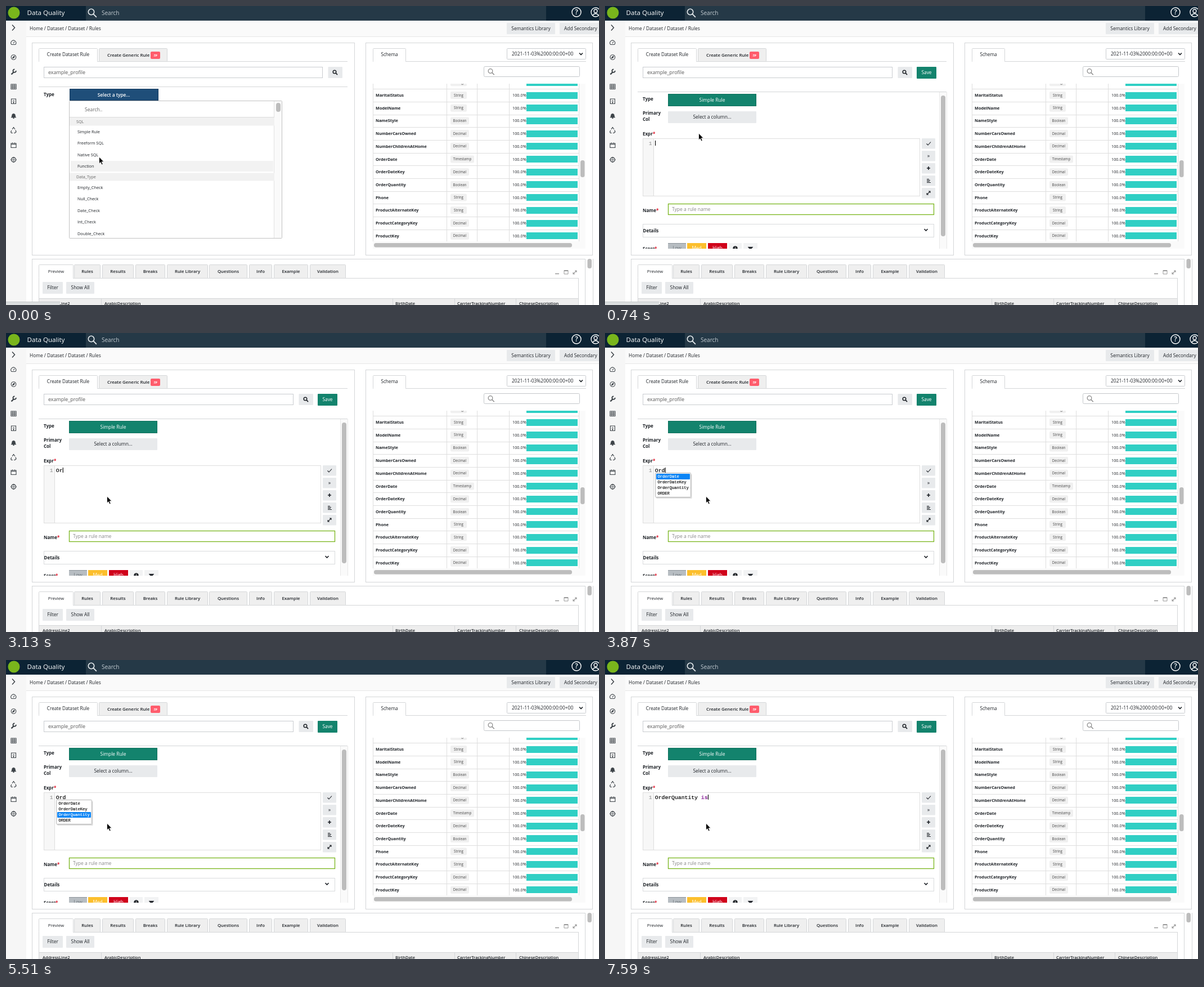
An HTML page that plays this animation: 1054x531 px, repeating every 8 s.

```html
<!DOCTYPE html>
<html lang="en">
<head>
<meta charset="utf-8">
<title>Dataset rules</title>
<style>
html, body { margin: 0; height: 100%; overflow: hidden; background: #fff; }
svg { display: block; width: 100vw; height: 100vh; font-family: "Open Sans", "Noto Sans", sans-serif; }
text { white-space: pre; }
.mono { font-family: "Liberation Mono", monospace; stroke: currentColor; stroke-width: .2px; }
</style>
</head>
<body>
<svg id="stage" viewBox="0 0 1054 531" preserveAspectRatio="none"></svg>
<script>
const INK = '#1f2328', LINE = '#d4d6d8', SOFT = '#e8eaec', THUMB = '#bdbdbd', GREEN = '#13836d';

// Shape helpers: boxes take left, top, right, bottom; text takes the middle of its line.
const rect = (x, y, r, b, fill, round = 0) =>
  `<rect x="${x}" y="${y}" width="${r - x}" height="${b - y}" rx="${round}" fill="${fill}"/>`;
const frame = (x, y, r, b, stroke = LINE, fill = '#fff', round = 0, w = 1) =>
  `<rect x="${x + .5}" y="${y + .5}" width="${r - x - 1}" height="${b - y - 1}" rx="${round}" fill="${fill}" stroke="${stroke}" stroke-width="${w}"/>`;
const path = (d, stroke = INK, w = 1, fill = 'none') =>
  `<path d="${d}" stroke="${stroke}" stroke-width="${w}" fill="${fill}"/>`;
const circle = (x, y, r, stroke, w = 1, fill = 'none') =>
  `<circle cx="${x}" cy="${y}" r="${r}" stroke="${stroke}" stroke-width="${w}" fill="${fill}"/>`;
const text = (s, x, y, size = 8.3, weight = 500, fill = INK, anchor = 'start', extra = '') =>
  `<text x="${x}" y="${y + size * .35}" font-size="${size}" font-weight="${weight}" fill="${fill}" text-anchor="${anchor}" ${extra}>${s}</text>`;
const mid = (s, x, y, size, weight, fill) => text(s, x, y, size, weight, fill, 'middle');
const mono = (s, x, y, size, fill) => text(s, x, y, size, 400, fill, 'start', `class="mono" color="${fill}"`);
const button = (s, x, y, r, b, fill = SOFT, ink = INK, size = 8.4) =>
  rect(x, y, r, b, fill, 1) + mid(s, (x + r) / 2, (y + b) / 2, size, 500, ink);
const lens = (x, y, r, color, w) =>
  circle(x, y, r, color, w) + path(`M${x + r * .7} ${y + r * .7}l${r * 1.1} ${r * 1.1}`, color, w * 1.15);
const chevron = (x, y, color = INK) => path(`M${x - 3} ${y - 1.5}l3 3l3-3`, color, 1.7);
const tab = (s, x, y, r, b, active) =>
  frame(x, y, r, b + 1, LINE, active ? '#fff' : '#efefef', 1) +
  (active ? rect(x + 1, b - .5, r - 1, b + 2, '#fff') : path(`M${x} ${b + .5}H${r}`, LINE)) +
  mid(s, (x + r) / 2, (y + b) / 2, active === undefined ? 7.8 : 8.2, active === undefined ? 600 : 500);
const expand = (x, y, color) =>
  path(`M${x - 3} ${y + 3}l6-6M${x} ${y - 3}h3v3M${x - 3} ${y}v3h3`, color, 1.1);

function header() {
  return rect(0, 0, 1054, 26, '#0c2334') + rect(142, 0, 960, 26, '#253947') +
    circle(14, 12, 10.5, 'none', 0, '#79b51c') +
    text('Data Quality', 37.5, 12, 11.6, 500, '#fff') +
    lens(151.5, 10.5, 5.2, '#e8edf0', 1.6) + text('Search', 170, 12, 10, 400, '#c3ccd2') +
    circle(1014, 11, 8, '#fff', 1.4) + mid('?', 1014, 11, 12, 600, '#fff') +
    circle(1048, 11, 8, '#fff', 1.4) + circle(1048, 9, 3, '#fff', 1.3) +
    path('M1042.5 16.5q5.5-6 11 0', '#fff', 1.3) +
    rect(0, 26, 36, 531, '#f6f6f6') + rect(36, 26, 1054, 54, '#fafafa') + path('M36 54.5H1054', '#e6e6e6') +
    text('Home / Dataset / Dataset / Rules', 42, 40, 8.35) +
    button('Semantics Library', 890, 30, 976, 50) +
    rect(984, 30, 1054, 50, SOFT) + text('Add Secondary', 992, 40, 8.4);
}

function sidebar() {
  const c = '#3d4348';
  return path('M11 33.5l4.5 5l-4.5 5', c, 1.5) +
    path('M9.8 68.5a4.5 4.5 0 1 1 7 0zM13 66.5l2-3', c, 1.1) +
    circle(13.5, 91, 4.3, c, 1.1) + path('M15.8 88.7l-1.3 3.3l-3.3 1.3l1.3-3.3z', c, .5, c) +
    path('M9.5 121.5l4.5-4.5', c, 2.4) + path('M17.8 114.8a2.7 2.7 0 1 1-2.5-2.3', c, 1.9) +
    path('M9 139h9v8.5h-9zM9 142h9M9 144.8h9M12 139v8.5M15 139v8.5', c, 1.1) +
    path('M9.5 165h8v8.5h-8zM12 168h3M12 170.5h3M13.5 171v2.5', c, 1.1) +
    path('M9 198q1.5-1 1.5-3.5q0-3 3-3.3q3 .3 3 3.3q0 2.5 1.5 3.5z', c, .6, c) + circle(13.5, 199, 1, c, .5, c) +
    path('M11 219l2.5-3.5l2.5 3.5M17 220.5l1 3l-2 2h-2M12 225.5h-2.5l-.8-2l1.3-2.5', c, 1.2) +
    path('M9 244h9v7.5h-9zM9 245.5h9M11.5 242.5v2M15.5 242.5v2', c, 1.1) +
    circle(13.5, 273, 4, c, 1.4) + circle(13.5, 273, 1.5, c, 1) +
    path('M13.5 268v1.5M13.5 276.5v1.5M8.5 273h1.5M17 273h1.5', c, 1.4);
}

function schema() {
  const rows = ['', 'MaritalStatus', 'ModelName', 'NameStyle', 'NumberCarsOwned', 'NumberChildrenAtHome', 'OrderDate',
    'OrderDateKey', 'OrderQuantity', 'Phone', 'ProductAlternateKey', 'ProductCategoryKey', 'ProductKey'];
  const types = { S: ['String', 29], B: ['Boolean', 33], D: ['Decimal', 33], T: ['Timestamp', 42] };
  const table = rows.map((name, i) => {
    const y = 135.8 + 22.7 * i, top = Math.round(y - 6), [type, w] = types['SSSBDDTDBSSDD'[i]];
    return path(`M652 ${Math.round(y + 11.3) + .5}H1018`, '#dedede') + text(name, 657, y, 7.3, 700) +
      rect(790, y - 6.5, 790 + w, y + 6.5, '#f0f0f0', 2) + mid(type, 790 + w / 2, y, 6.2, 400, '#444') +
      text('100.0%', 900, y, 7.3, 500) + rect(925, top, 1016, top + 12, '#30cfc4');
  }).join('');
  return frame(639, 65, 1043, 443) + path('M652 98.5H1031', LINE) + tab('Schema', 652, 75, 711, 98, true) +
    frame(890, 75, 1031, 95, '#c9ccd0', '#fff', 1) + text('2021-11-03%2000:00:00+00', 899, 85, 8.5, 400) +
    chevron(1022, 85) + frame(849, 107, 1020, 126, '#c4c7ca', '#fff', 2) + lens(861, 115.5, 3.8, '#8b8b8b', 1.3) +
    `<g clip-path="url(#rows)">${table}${path('M652.5 138V418M783.5 138V418M837.5 138V418M894.5 138V418M1018.5 138V418', '#dedede')}</g>` +
    rect(652, 418, 1030, 431, '#fafafa') + rect(1019, 138, 1030, 431, '#fafafa') +
    rect(1021, 274, 1028.5, 304, THUMB, 3.5) + rect(654, 421, 1006, 428.5, THUMB, 3.5);
}

function bottom() {
  const tabs = [['Preview', 58, 120], ['Rules', 121, 168], ['Results', 171, 227], ['Breaks', 230, 283],
    ['Rule Library', 286, 359], ['Questions', 361, 429], ['Info', 432, 473], ['Example', 476, 537], ['Validation', 540, 604]];
  const heads = [['AddressLine2', 65], ['ArabicDescription', 175], ['BirthDate', 692],
    ['CarrierTrackingNumber', 802], ['ChineseDescription', 912]];
  return frame(46, 449, 1030, 540) + path('M1043.5 449V531', LINE) + rect(1033.5, 449, 1041, 466, THUMB, 3.5) +
    frame(58, 483, 1018, 540) +
    tabs.map(([s, x, r]) => tab(s, x, 459, r, 483) + (s === 'Preview'
      ? rect(x + 1, 460, r - 1, 485, '#fff') + mid(s, 89, 471, 7.9, 500) : '')).join('') +
    path('M976 475.5h7', '#999', 1.5) + path('M992 469.5h7v6.5h-7zM992 470.5h7', '#999') + expand(1011, 473, '#999') +
    button('Filter', 65, 490, 101, 511) + button('Show All', 107, 490, 157, 511) +
    rect(59, 519, 1017, 531, '#ededed') + path('M59 519.5H1017M169.5 520V531M687.5 520V531M797.5 520V531M906.5 520V531', LINE) +
    heads.map(([s, x]) => text(s, x, 528, 7.5, 600)).join('');
}

function ruleTabs() {
  return frame(46, 65, 620, 443) + path('M58 98.5H607', LINE) +
    tab('Create Dataset Rule', 58, 75, 163, 98, true) + tab('', 165, 75, 287, 98, false) +
    text('Create Generic Rule', 180, 87, 7.9, 600) + rect(257, 81, 274, 94, '#ff5c6c', 2) +
    text('TP', 265.5, 87.5, 6, 700, '#fff', 'middle', 'font-style="italic"');
}

const profile = right => frame(67, 108, right, 128, '#c9ccd0') + text('example_profile', 75, 118, 8.9, 400, '#555') +
  rect(right + 9.5, 108, right + 35, 128, SOFT, 1) + lens(right + 21, 117, 2.8, INK, 1.5);

const menuRows = [['Simple Rule', 223], ['Freeform SQL', 243.5], ['Native SQL', 264.5], ['Function', 284.5],
  ['Empty_Check', 322], ['Null_Check', 342], ['Date_Check', 363], ['Int_Check', 383.5], ['Double_Check', 404]];

function menuView() {
  return profile(563) + path('M58 143.5H607', LINE) + text('Type', 67, 157.5, 8, 700) +
    '<rect id="pick" x="113.5" y="147.5" width="157" height="20"/>' + mid('Select a type...', 191.5, 158, 8.3, 600, '#fff') +
    frame(112, 168, 491, 413, '#c2c2c2', '#fff', 1) + rect(477, 169, 490, 412, '#fafafa') + path('M476.5 169V412', '#e2e2e2') +
    rect(480, 172, 488, 188, THUMB, 4) + text('Search..', 140, 184, 8.5, 400, '#666') + path('M113 197.5H477', '#ddd') +
    rect(113, 198, 477, 212.5, '#f1f1f1') + text('SQL', 125, 205.5, 7.2, 400, '#666') +
    rect(113, 296.5, 477, 310.5, '#f1f1f1') + text('Data_Type', 125, 303.5, 7.2, 400, '#666') +
    '<rect id="hover" x="115" width="360" height="19" fill="#f2f2f2"/>' +
    menuRows.map(([s, y]) => text(s, 127, y, 7.3, 500)).join('');
}

function formView() {
  const label = (s, y, starX) => text(s, 67, y, 8, 700) + text('*', starX, y, 8, 700, '#e0182d');
  const tools = [235, 257, 279, 301, 323].map(y => rect(563, y, 587, y + 18.5, SOFT, 1)).join('') +
    path('M571.5 244.5l2.5 2.5l5-5.5', INK, 1.1) + mid('»', 575, 266, 9, 500) +
    path('M572 288h6M575 285v6', INK, 1.7) + path('M572 307.5h4M572 309.5h6M572 311.5h5M572 313.5h7', INK, 1.1) +
    expand(575, 332, INK);
  const score = label('Score', 431, 88) +
    [['Low', 112, 144, '#b7bdc2', '#6d747a'], ['Med', 146, 180, '#fcbf2d', '#fff'], ['High', 183, 217, '#d0021b', '#fff']]
      .map(([s, x, r, fill, ink]) => rect(x, 421, r, 441, fill) + mid(s, (x + r) / 2, 430.5, 8.3, 500, ink)).join('') +
    path('M112 421.5H144', '#8d959b') + rect(220, 421, 243, 441, '#f2f3f4') + rect(246, 421, 271, 441, '#f2f3f4') +
    circle(231.5, 430.5, 4, INK, .5, INK) + path('M231.5 428v1.2M231.5 430v3', '#fff', 1.1) +
    path('M254 428h9l-4.5 5z', INK, .5, INK);
  return profile(511) + button('Save', 554, 108, 589, 129, GREEN, '#fff') + path('M58 152.5H607', LINE) +
    text('Type', 67, 165.5, 8, 700) + frame(112, 156, 269, 178, '#0f705d', GREEN) + mid('Simple Rule', 190.5, 167, 8.4, 500, '#fff') +
    text('Primary', 67, 190, 8, 700) + text('Col', 67, 201, 8, 700) +
    button('Select a column...', 112, 187, 269, 208) + label('Expr', 227, 85) +
    frame(67, 235, 560, 338, '#dedede') + rect(68, 236, 86, 337, '#f7f7f7') + path('M86.5 236V337', '#ddd') +
    mono('1', 78, 243.5, 9, '#999') + tools +
    label('Name', 363, 91) + frame(112, 351, 585, 371, '#79b51c', '#fff', 0, 1.3) +
    text('Type a rule name', 119, 361, 8.5, 400, '#888') +
    frame(67, 387, 585, 411, '#d9dbdd') + text('Details', 67.5, 399, 8, 700) + chevron(570.5, 397.5) +
    rect(594, 153, 607, 431, '#fafafa') + path('M594.5 153V431M607.5 153V431', '#e8e8e8') + rect(597, 159, 605, 409, THUMB, 4) +
    `<g clip-path="url(#form)">${score}</g>` +
    '<g id="code"></g><rect id="caret" y="239" width="1.1" height="9" fill="#000"/><g id="hints"></g>';
}

const hintList = ['OrderDate', 'OrderDateKey', 'OrderQuantity', 'ORDER'];
const hints = pick => pick < 0 ? '' : rect(91, 251, 154.5, 294, '#0002', 1) + frame(89, 248, 153, 292, '#b5b5b5', '#fff', 1) +
  hintList.map((s, i) => {
    const y = 255 + 10 * i, on = i === pick;
    return (on ? rect(91, y - 5, 151, y + 5, '#0a84f5', 1) : '') + mono(s, 93.5, y, 7.1, on ? '#fff' : '#111');
  }).join('');

const stage = document.getElementById('stage');
stage.innerHTML = '<defs><clipPath id="rows"><rect x="652" y="138" width="368" height="280"/></clipPath>' +
  '<clipPath id="form"><rect x="58" y="412" width="540" height="19"/></clipPath></defs>' +
  rect(0, 0, 1054, 531, '#fff') + header() + sidebar() + schema() + bottom() + ruleTabs() +
  `<g id="menu">${menuView()}</g><g id="rule">${formView()}</g>` +
  `<g id="status">${rect(0, 525, 96, 531, '#dcdfe0', 1)}${path('M0 525.5H96', '#c4c8c9')}</g>` +
  `<g id="mouse">${path('M0 0V12L2.7 9.5L4.6 14L6.7 13.1L4.8 8.7H8.5Z', '#fff', .8, '#000')}</g>`;
const el = id => document.getElementById(id);

// Each track lists [start ms, value]; a value holds until the next one.
const tracks = {
  mouse: [[0, [165.5, 268]], [150, [166, 237]], [300, [165.5, 229]], [440, [166.5, 226]], [890, [168.5, 245.5]], [1040, [179.5, 290]]],
  hover: [[0, 3], [150, 1], [300, 0]],
  status: [[0, 1], [1040, .5], [1190, 0]],
  code: [[0, ''], [2830, 'O'], [3130, 'Or'], [3280, 'Ord'], [5660, 'OrderQuantity'], [6550, 'OrderQuantity '], [7450, 'OrderQuantity i'], [7590, 'OrderQuantity is']],
  caret: [[0, 1], [1190, 0], [1790, 1], [2390, 0], [2830, 1], [4470, 0], [4920, 1], [5510, 0], [5660, 1], [6100, 0], [6550, 1], [7150, 0], [7450, 1]],
  hint: [[0, -1], [3870, 0], [4920, 1], [5070, 2], [5660, -1]]
};
const at = (name, t) => tracks[name].filter(k => k[0] <= t).pop()[1];
const CHAR = 5.87;

function draw(t) {
  el('menu').style.display = t < 740 ? '' : 'none';
  el('rule').style.display = t < 740 ? 'none' : '';
  el('pick').setAttribute('fill', t < 590 ? '#1f4e79' : '#03785f');
  el('pick').setAttribute('stroke', t < 590 ? '#153a5e' : '#02654f');
  el('hover').setAttribute('y', menuRows[at('hover', t)][1] - 9.5);
  el('status').setAttribute('opacity', at('status', t));
  el('mouse').setAttribute('transform', `translate(${at('mouse', t)})`);
  const code = at('code', t);
  el('code').innerHTML = mono(code.replace(/is$/, '<tspan fill="#708" color="#708">is</tspan>'), 88.8, 243.5, CHAR / .6, '#000');
  el('caret').setAttribute('x', 89 + code.length * CHAR);
  el('caret').setAttribute('opacity', at('caret', t));
  el('hints').innerHTML = hints(at('hint', t));
}

const start = performance.now();
function tick() {
  draw((performance.now() - start) % 8000);
  requestAnimationFrame(tick);
}
tick();
</script>
</body>
</html>
```
